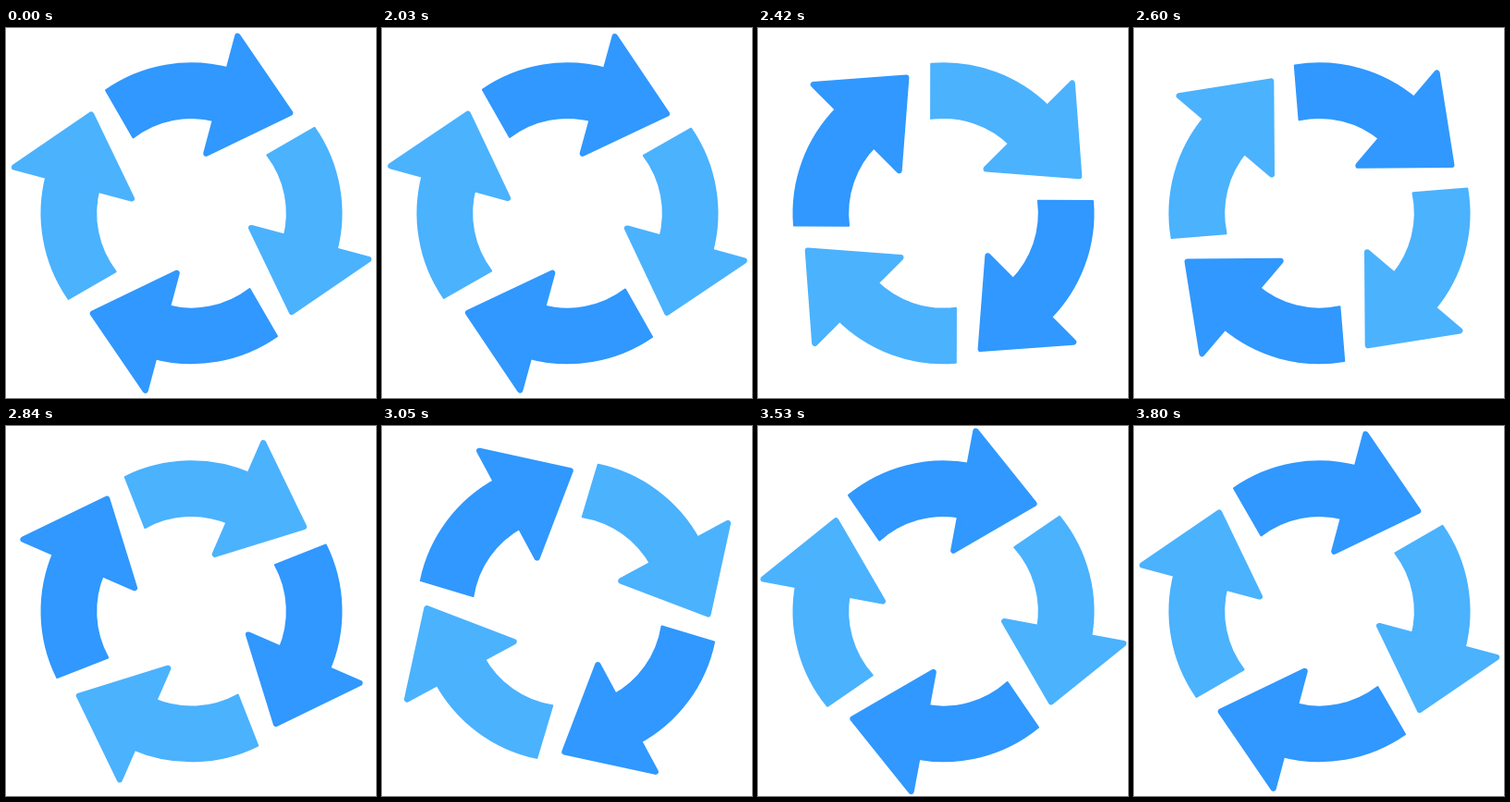
An HTML page that plays this animation: 400 by 400 pixels, repeating every 3.83 s.

```html
<!DOCTYPE html>
<html lang="en">
<head>
<meta charset="utf-8">
<title>Turning arrows</title>
<style>
  html, body { margin: 0; width: 100%; height: 100%; overflow: hidden; background: #fff; }
  svg { display: block; width: 100vw; height: 100vh; }
  .dark { fill: #3098fe; stroke: #3098fe; }
  .light { fill: #4bb2fe; stroke: #4bb2fe; }
</style>
</head>
<body>
<svg viewBox="0 0 400 400">
  <defs>
    <g id="arrow" stroke-linejoin="round">
      <path stroke-width="2" d="M-123.8-104.5A162 162 0 0 1 0-162V-103.3A103.3 103.3 0 0 0-82.05-62.75Z"/>
      <path stroke-width="6.4" d="M-1.4-197.8L74.9-132.3L-1.4-66.6Z"/>
    </g>
  </defs>
  <g id="wheel">
    <use href="#arrow" class="dark"/>
    <use href="#arrow" class="light" transform="rotate(90)"/>
    <use href="#arrow" class="dark" transform="rotate(180)"/>
    <use href="#arrow" class="light" transform="rotate(270)"/>
  </g>
</svg>
<script>
const LOOP = 3830, REST = 2000, STEP = 30, STEPS = 60, START_ANGLE = 15;
const wheel = document.getElementById('wheel');

// Cubic Bezier easing with control points (0.29, 0) and (0.177, 1).
function ease(x) {
  let lo = 0, hi = 1;
  for (let i = 0; i < 30; i++) {
    const u = (lo + hi) / 2, v = 1 - u;
    const at = 3 * u * v * v * 0.29 + 3 * u * u * v * 0.177 + u * u * u;
    if (at < x) lo = u; else hi = u;
  }
  return lo * lo * (3 - 2 * lo);
}

function draw(ms) {
  const step = Math.floor((ms % LOOP - REST) / STEP);
  const p = Math.min(Math.max(step / STEPS, 0), 1);
  const angle = START_ANGLE + 360 * ease(p);
  wheel.setAttribute('transform', `translate(200.5 200.3) rotate(${angle.toFixed(3)})`);
}

const start = performance.now();
function tick() {
  draw(performance.now() - start);
  requestAnimationFrame(tick);
}
tick();
</script>
</body>
</html>
```
